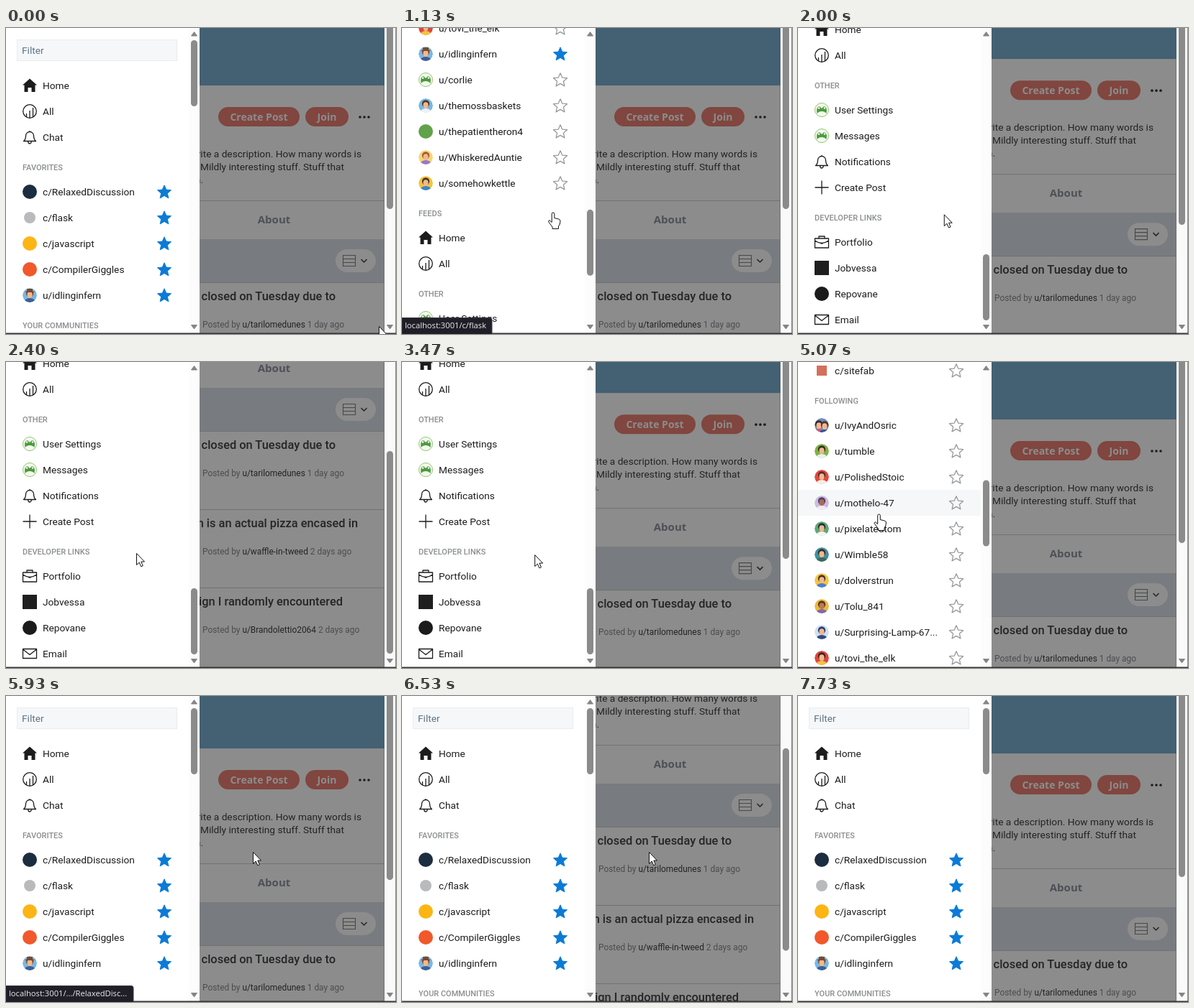
An HTML page for the animation above (8.14 s loop, 542x426 px).

```html
<!DOCTYPE html>
<html lang="en">
<head>
<meta charset="utf-8">
<title>Sidebar scrolling</title>
<style>
html, body { margin: 0; width: 100%; height: 100%; overflow: hidden; background: #fff; }
svg { display: block; width: 542px; height: 426px; font-family: Roboto, sans-serif; font-size: 13.7px; }
.bold { font-family: "Noto Sans", "Open Sans", sans-serif; font-weight: 700; font-size: 14px; }
.head { font-size: 11px; font-weight: 500; fill: #8b8e90; }
.title { font-size: 16.4px; font-weight: 500; fill: #242526; text-anchor: end; }
.meta { font-size: 11.9px; fill: #4b4d4f; }
.url { font-family: "Open Sans", sans-serif; font-size: 11.2px; fill: #eceaf0; }
.line { fill: none; stroke: #1c1c1c; stroke-width: 1.3; stroke-linejoin: round; }
</style>
</head>
<body>
<svg id="stage" viewBox="0 0 542 426"></svg>
<script>
const LOOP = 8140, FPS = 15;
const DIM = '#8c8c8c';   // white under the dark overlay

const rect = (x, y, w, h, fill, more = '') =>
  `<rect x="${x}" y="${y}" width="${w}" height="${h}" fill="${fill}" ${more}/>`;
const text = (x, y, s, more = '') => `<text x="${x}" y="${y}" ${more}>${s}</text>`;
const path = (d, more = 'class="line"') => `<path d="${d}" ${more}/>`;
const disc = (fill, r = 10) => `<circle r="${r}" fill="${fill}"/>`;
const at = (x, y, s) => `<g transform="translate(${x} ${y})">${s}</g>`;

const face = (bg, hair, shirt, skin = '#f0b98d') => `<g clip-path="url(#round)">${disc(bg)}
  <ellipse cy="10" rx="8" ry="6" fill="${shirt}"/><circle cy="-2.5" r="5.2" fill="${hair}"/>
  <ellipse cy="-.3" rx="3.6" ry="4.4" fill="${skin}"/></g>`;

const frog = `<circle r="9.5" fill="#f3faee" stroke="#8fc56f"/>
  <path d="M-6.500 5Q-8-3-4.500-4.500-2-5.500-1-2.500H1Q2-5.500 4.500-4.500 8-3 6.500 5Q4 2 0 2T-6.500 5Z" fill="#4c9a3c"/>
  <circle cx="-4" cy="-2.500" r="1.300" fill="#fff"/><circle cx="4" cy="-2.500" r="1.300" fill="#fff"/>`;

const icons = {
  home: path('M0-9.500 10-.5H7.500V9H2.500V3H-2.500V9H-7.500V-.5H-10Z', 'fill="#1c1c1c"'),
  all: '<circle r="9.300" class="line"/>' + path('M-4.500 8V3M0 9V-1M4.500 8V-5'),
  bell: path('M-8.500 5.500Q-5.500 3-5.500-2A5.500 5.500 0 0 1 5.500-2Q5.500 3 8.500 5.500ZM-2.300 6a2.300 3 0 0 0 4.600 0M0-9V-7.500'),
  plus: path('M-9.500 0H9.500M0-9.500V9.500'),
  brief: path('M-9.500-5H9.500V8H-9.500ZM-4-5V-8H4V-5M-9.500-2Q0 5 9.500-2M-1.500 2H1.500'),
  mail: path('M-9.500-6.500H9.500V6.500H-9.500ZM-9.500-6 0 1.500 9.500-6'),
  square: rect(-10, -10, 20, 20, '#1f1f1f'),
  dot: disc('#1b1b1b'),
  frog,
  navy: disc('#1c2d40'),
  grey: disc('#b9babb', 8),
  amber: disc('#fdb515'),
  orange: disc('#f1582c'),
  coral: rect(-7, -7, 14, 14, '#d4705c'),
  teal: disc('#4fa8a0'),
  green: disc('#62a24a'),
  hat: face('#79b7e6', '#7a4a2e', '#3d5f95') +
    path('M-7-4H7L4-6V-9H-4V-6Z', 'fill="#7a4a2e"'),
  pair: `<g clip-path="url(#round)">${disc('#6d8cc4')}${at(-4, 1, face('none', '#3a2630', '#d8596a'))}${at(4, 2, face('none', '#5a3322', '#3056a0'))}</g>`
};

// Heading, then its rows: label, icon, star (1 filled, 0 outline, absent none)
const people = [
  ['IvyAndOsric', 'pair'], ['tumble', face('#7cb342', '#3b2a25', '#e9eef0')],
  ['PolishedStoic', face('#e2483d', '#5a2a30', '#f4eee6')],
  ['mothelo-47', face('#c9bcdf', '#5a3b66', '#f0ecf4', '#a86e52')],
  ['pixelatedtom', face('#5fa777', '#24323a', '#f4f4f4')],
  ['Wimble58', face('#3f8f9f', '#3d2c28', '#3c6a58')],
  ['dolverstrun', face('#f4c542', '#49322b', '#4a7fd0')],
  ['Tolu_841', face('#edb83f', '#543324', '#7f6aa8', '#b97a52')],
  ['Surprising-Lamp-67...', face('#cfe0f2', '#2d3c6b', '#2f4a86')],
  ['tovi_the_elk', face('#e0453c', '#3f2020', '#f2c341')],
  ['idlinginfern', 'hat', 1], ['corlie', 'frog'],
  ['themossbaskets', face('#74b9e4', '#553629', '#f1f1f1')],
  ['thepatientheron4', 'green'],
  ['WhiskeredAuntie', face('#f6d678', '#a65634', '#9a78c4')],
  ['somehowkettle', face('#f3c440', '#4b3328', '#3b86c8')]
].map(([n, i, s = 0]) => ['u/' + n, i, s]);

const menu = [
  ['', [['Home', 'home'], ['All', 'all'], ['Chat', 'bell']]],
  ['FAVORITES', [['c/RelaxedDiscussion', 'navy', 1], ['c/flask', 'grey', 1],
    ['c/javascript', 'amber', 1], ['c/CompilerGiggles', 'orange', 1], ['u/idlinginfern', 'hat', 1]]],
  ['YOUR COMMUNITIES', [['c/CompilerGiggles', 'orange', 1], ['c/flask', 'grey', 1],
    ['c/javascript', 'amber', 1], ['c/mapdoodles', 'teal', 0], ['c/plantcorner', 'green', 0],
    ['c/RelaxedDiscussion', 'navy', 1], ['c/sketchnook', 'coral', 0], ['c/sitefab', 'coral', 0]]],
  ['FOLLOWING', people],
  ['FEEDS', [['Home', 'home'], ['All', 'all']]],
  ['OTHER', [['User Settings', 'frog'], ['Messages', 'frog'], ['Notifications', 'bell'], ['Create Post', 'plus']]],
  ['DEVELOPER LINKS', [['Portfolio', 'brief'], ['Jobvessa', 'square'], ['Repovane', 'dot'], ['Email', 'mail']]]
];

const starPath = 'M' + Array.from({ length: 10 }, (_, i) => {
  const r = i % 2 ? 4.6 : 10, a = i * Math.PI / 5;
  return `${(r * Math.sin(a)).toFixed(2)} ${(-r * Math.cos(a)).toFixed(2)}`;
}).join('L') + 'Z';
const star = on => path(starPath, on
  ? 'fill="#0b7bd7" stroke="#0b7bd7" stroke-linejoin="round"'
  : 'fill="none" stroke="#96999b" stroke-width="1.300" stroke-linejoin="round"');

const rowY = [];
function listMarkup() {
  let y = 38, out = rect(15.5, 16.5, 222, 29, '#f6f7f9', 'stroke="#e9ecef"') +
    text(22, 36, 'Filter', 'fill="#5d7386"');
  for (const [head, rows] of menu) {
    y += 42;
    if (head) {
      out += text(23, y + 4, head, 'class="head"');
      y += 34;
    }
    rows.forEach(([label, icon, fav], i) => {
      if (i) y += 36;
      rowY.push(y);
      out += at(33, y, icons[icon] || icon) + text(51, y + 5, label, 'fill="#1c1c1c"');
      if (fav !== undefined) out += at(220, y + 0.8, star(fav));
    });
  }
  return out;
}

const post = (i, end, title, user, ago) => at(0, 355 + 109 * i,
  rect(240, 0, 286, 109, DIM) + rect(240, -1, 286, 1, '#707172') +
  text(end, 24, title, 'class="title"') +
  text(273, 62, `Posted by <tspan fill="#232425">${user}</tspan> ${ago}`, 'class="meta"'));

const pill = (x, w, label) => rect(x, 110, w, 27, '#80463f', 'rx="13.5"') +
  text(x + w / 2, 129, label, `class="bold" fill="${DIM}" text-anchor="middle"`);

const pageMarkup = () => rect(240, -200, 286, 900, DIM) +
  rect(240, -200, 286, 280, '#446073') +
  pill(295, 113, 'Create Post') + pill(416, 60, 'Join') +
  [492, 498, 504].map(x => `<circle cx="${x}" cy="124" r="1.800" fill="#1d1d1d"/>`).join('') +
  '<g fill="#222324" text-anchor="end">' +
  text(494, 180, 'Please write a description. How many words is') +
  text(470, 198, 'Mildly interesting stuff. Stuff that') + text(274, 216, 'is fun.') + '</g>' +
  rect(240, 240, 286, 1, '#707172') +
  text(372.5, 272, 'About', 'class="bold" style="font-size:15px" fill="#4d5156" text-anchor="middle"') +
  rect(240, 294, 286, 61, '#787b7f') + rect(458, 308, 56, 32, DIM, 'rx="16"') +
  path('M468.500 316.500H485.500V331.500H468.500ZM468.500 321.500H485.500M468.500 326.500H485.500',
    'fill="none" stroke="#48494a" stroke-width="1.100"') +
  path('M493.500 322 497.500 326 501.500 322', 'fill="none" stroke="#252525" stroke-width="1.500"') +
  post(0, 458, 'The library is closed on Tuesday due to', 'u/tarilomedunes', '1 day ago') +
  post(1, 489, 'This lesson is an actual pizza encased in', 'u/waffle-in-tweed', '2 days ago') +
  post(2, 468, 'The sign I randomly encountered', 'u/Brandolettio2064', '2 days ago') +
  rect(525, 80, 1, 700, '#707172');

const arrowDown = x => path(`M${x - 4} 413.500h8l-4 5.500z`, 'fill="#858585" stroke="#858585" stroke-linejoin="round"');

const stage = document.getElementById('stage');
stage.innerHTML = `
  <defs><clipPath id="round"><circle r="10"/></clipPath></defs>
  <g id="page">${pageMarkup()}</g>
  ${rect(526, 0, 16, 426, '#fafafa')}${rect(541, 0, 1, 426, '#8d8d8d')}
  ${rect(529, -30, 9, 282, '#8b8b8b', 'rx="4.5" id="pageThumb"')}${arrowDown(533.5)}
  ${rect(0, 0, 269, 426, '#fff')}
  ${rect(0, 0, 254, 36, '#f6f7f8', 'id="hover"')}
  <g id="list">${listMarkup()}</g>
  ${rect(254, 0, 15, 426, '#fcfcfc')}
  ${rect(257, 17, 9, 92, '#8b8b8b', 'rx="4.5" id="listThumb"')}
  ${path('M257.500 11h8l-4-5.500z', 'fill="#858585" stroke="#858585" stroke-linejoin="round"')}${arrowDown(261.5)}
  ${rect(0, 424.5, 542, 1.5, '#353334')}
  <g id="status">${rect(-5, 403.5, 130, 30, '#201f27', 'rx="3" stroke="#3d3c45" id="statusBox"')}
    ${text(4, 418, '', 'class="url" id="url"')}</g>
  <g id="cursor" fill="#fff" stroke="#111" stroke-linejoin="round">
    <path id="arrow" d="M.5.5V16.500L4.200 13 6.700 18.800 9.300 17.700 6.800 12H11.500Z"/>
    <path id="hand" d="M-1.800 1.800a1.800 1.800 0 0 1 3.600 0V7.500L7.800 9Q10 9.500 10 12L9.300 16 7.500 19V22.500H-1V20L-5.500 14Q-7.500 11-5 10.800L-1.800 13.500Z"/>
  </g>`;
const el = {};
stage.querySelectorAll('[id]').forEach(n => el[n.id] = n);

// Keys are [seconds, value, value...], linear in between
function track(keys, t) {
  const i = keys.findIndex(k => k[0] > t);
  if (i < 0) return keys[keys.length - 1].slice(1);
  if (!i) return keys[0].slice(1);
  const a = keys[i - 1], b = keys[i], u = (t - a[0]) / (b[0] - a[0]);
  return a.slice(1).map((v, j) => v + (b[j + 1] - v) * u);
}
const fr = n => n / FPS;

const listKeys = [[fr(6), 0], [fr(13), 800], [fr(14), 800], [fr(17), 1100], [fr(18), 1100],
  [fr(22), 1390], [fr(68), 1390], [fr(76), 688], [fr(84), 0]];
const pageKeys = [[fr(29), 0], [fr(36), 258], [fr(40), 258], [fr(48), 0], [fr(51), 0], [fr(58), 258],
  [fr(60), 258], [fr(62), 159], [fr(64), 0], [fr(88), 0], [fr(89), 7], [fr(94), 258], [fr(96), 258], [fr(102), 0]];
const cursorKeys = [[0, 518, 415], [fr(6), 210, 257], [fr(29), 210, 257], [fr(33), 181, 266],
  [fr(40), 181, 266], [fr(48), 184, 268], [fr(51), 184, 268], [fr(62), 186, 269], [fr(65), 186, 269],
  [fr(76), 112.5, 212], [fr(84), 130, 218], [fr(89), 343, 217], [fr(98), 343, 217], [fr(104), 500, 440]];

const show = (n, on) => n.setAttribute('visibility', on ? 'visible' : 'hidden');
const move = (n, x, y) => n.setAttribute('transform', `translate(${x.toFixed(2)} ${y.toFixed(2)})`);

function draw(ms) {
  const n = Math.floor(ms * FPS / 1000 + 0.1), t = fr(n) + 1e-6;
  const [s] = track(listKeys, t), [p] = track(pageKeys, t), [cx, cy] = track(cursorKeys, t);
  const hand = (n >= 5 && n < 26) || (n >= 67 && n < 86);

  move(el.list, 0, -s);
  move(el.page, 0, -p);
  move(el.listThumb, 0, s * 298 / 1390);
  move(el.pageThumb, 0, p * 154 / 258);
  move(el.cursor, cx, cy);
  show(el.hand, hand);
  show(el.arrow, !hand);

  const row = hand ? rowY.find(y => Math.abs(y - s - cy) < 18) : undefined;
  show(el.hover, row !== undefined);
  if (row !== undefined) el.hover.setAttribute('y', row - s - 18);

  const first = n >= 6 && n < 30, second = n >= 82 && n < 94;
  show(el.status, first || second);
  el.url.textContent = first ? 'localhost:3001/c/flask' : 'localhost:3001/.../RelaxedDisc...';
  el.statusBox.setAttribute('width', first ? 130 : 182);
}

const start = performance.now();
function tick() {
  draw((performance.now() - start) % LOOP);
  requestAnimationFrame(tick);
}
draw(0);
requestAnimationFrame(tick);
</script>
</body>
</html>
```
